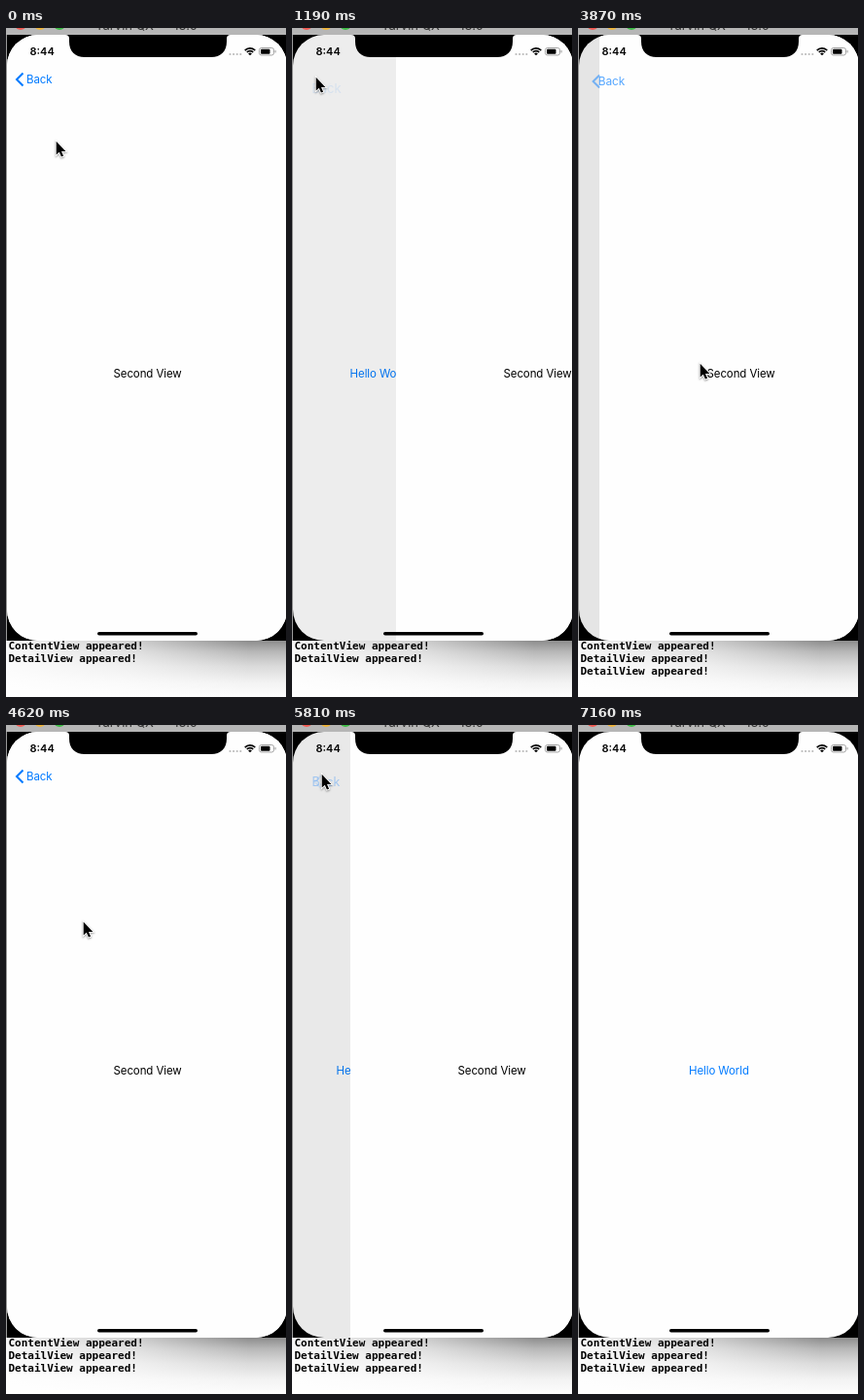
An HTML page with a canvas for the animation above (7760 ms loop, 288 px wide and 689 px high).

```html
<!DOCTYPE html>
<html lang="en">
<head>
<meta charset="utf-8">
<title>Navigation demo</title>
<style>
  html, body { margin: 0; width: 100%; height: 100%; overflow: hidden; background: #fff; }
  canvas { display: block; width: 288px; height: 689px; }
</style>
</head>
<body>
<canvas id="stage" width="288" height="689"></canvas>
<script>
const ctx = document.getElementById('stage').getContext('2d');
const W = 288, H = 689, LOOP = 7760, STEP = 149.1;
const BLUE = '#007aff';
const UI = 'Inter, Roboto, sans-serif';
const MONO = '"DejaVu Sans Mono", "Liberation Mono", monospace';

// Cursor keys: [step, x, y]
const PATH = [
  [1, 51, 116], [5, 24, 50], [15, 24, 50], [16, 60, 179], [21, 125, 345],
  [29, 125, 345], [36, 31, 54], [37, 30, 50], [40, 30, 50],
  [44, 129, 327], [47, 252, 658]
];

// Fraction of a critically damped slide begun at `start`
function slide(time, start) {
  const u = Math.max(0, time - start) * 0.018;
  const p = 1 - (1 + u) * Math.exp(-u);
  return p > 0.997 ? 1 : p;
}

function cursorAt(step) {
  if (step <= PATH[0][0]) return PATH[0].slice(1);
  for (let i = 1; i < PATH.length; i++) {
    const [s0, x0, y0] = PATH[i - 1], [s1, x1, y1] = PATH[i];
    if (step <= s1) {
      const u = (step - s0) / (s1 - s0), e = u * (2 - u);
      return [x0 + (x1 - x0) * e, y0 + (y1 - y0) * e];
    }
  }
  return null;
}

function rect(x, y, w, h, color) {
  ctx.fillStyle = color;
  ctx.fillRect(x, y, w, h);
}

function pill(x, y, w, h, r, color) {
  ctx.beginPath();
  ctx.roundRect(x, y, w, h, r);
  ctx.fillStyle = color;
  ctx.fill();
}

function disc(x, y, r, color) {
  ctx.beginPath();
  ctx.arc(x, y, r, 0, Math.PI * 2);
  ctx.fillStyle = color;
  ctx.fill();
}

function text(str, x, y, color, font, spacing = '0px') {
  ctx.font = font;
  ctx.letterSpacing = spacing;
  ctx.fillStyle = color;
  ctx.fillText(str, x, y);
}

function label(str, x, y, color) {
  text(str, x, y, color, '400 11.5px ' + UI, '-0.1px');
}

function fade(x0, y0, x1, y1, stops) {
  const g = ctx.createLinearGradient(x0, y0, x1, y1);
  stops.forEach(([at, color]) => g.addColorStop(at, color));
  return g;
}

function drawConsole(lines) {
  rect(0, 0, W, H, '#fff');
  rect(0, 631, W, 58, fade(0, 631, 0, 689, [
    [0, '#8c8c8c'], [0.2, '#b8b8b8'], [0.45, '#dadada'], [0.75, '#f3f3f3'], [1, '#fdfdfd']
  ]));
  rect(0, 631, W, 58, fade(0, 0, 250, 0, [
    [0, 'rgba(255,255,255,.9)'], [0.5, 'rgba(255,255,255,.6)'], [1, 'rgba(255,255,255,0)']
  ]));
  lines.forEach((s, i) => text(s, 2.5, 640 + i * 13, '#000', 'bold 11px ' + MONO));
}

function drawWindow() {
  rect(0, 0, W, 7, '#b6b6b6');
  ['#f25a52', '#f0b53a', '#3dbd45'].forEach((c, i) => disc(15 + i * 20, -4, 6, c));
  text('Tarvin QX — 13.0', 92, 2, '#333', '400 13px ' + UI);
  rect(0, 7, 1, 624, '#999');
  rect(1, 7, 287, 624, '#000');
}

function drawBack(q, pressed) {
  const strength = pressed ? 0.2 : 1;
  ctx.save();
  ctx.translate(0, 27 * q);
  ctx.globalAlpha = strength * (1 - q) ** 9;
  ctx.strokeStyle = BLUE;
  ctx.lineWidth = 2;
  ctx.beginPath();
  ctx.moveTo(17.5 + 60 * q, 46.5);
  ctx.lineTo(11 + 60 * q, 53);
  ctx.lineTo(17.5 + 60 * q, 59.5);
  ctx.stroke();
  ctx.globalAlpha = strength * (1 - q) ** 5;
  ctx.translate(21 - 2 * q, 57);
  ctx.scale(1 + 0.4 * q, 1 + 0.4 * q);
  label('Back', 0, 0, BLUE);
  ctx.restore();
}

// q: 0 shows the second view, 1 the first
function drawViews(q, pressedBack, pressedLink) {
  ctx.save();
  ctx.beginPath();
  ctx.roundRect(1, 7, 288, 624, 32);
  ctx.clip();
  rect(1, 7, 288, 624, '#fefefe');
  if (q > 0) {
    ctx.globalAlpha = pressedLink ? 0.25 : 1;
    label('Hello World', 114 - 86.4 * (1 - q), 360, BLUE);
    ctx.globalAlpha = 1;
    rect(1, 7, 288, 624, `rgba(0,0,0,${0.105 * (1 - q)})`);
  }
  if (q < 1) {
    const x = Math.round(288 * q);
    rect(x, 7, 290, 624, '#fefefe');
    label('Second View', 110.5 + x, 360, '#000');
    drawBack(q, pressedBack);
  }
  ctx.restore();
}

function drawStatus() {
  ctx.fillStyle = '#000';
  ctx.beginPath();
  ctx.moveTo(61, 7);
  ctx.quadraticCurveTo(65, 7, 65, 11);
  ctx.lineTo(65, 14);
  ctx.bezierCurveTo(65, 24, 71, 30, 81, 30);
  ctx.lineTo(211, 30);
  ctx.bezierCurveTo(221, 30, 227, 24, 227, 14);
  ctx.lineTo(227, 11);
  ctx.quadraticCurveTo(227, 7, 231, 7);
  ctx.fill();

  text('8:44', 24.5, 28, '#000', '600 11px ' + UI);
  for (let i = 0; i < 4; i++) disc(230.5 + i * 3.6, 27, 1.1, '#bbb');

  ctx.strokeStyle = '#000';
  ctx.lineWidth = 1.7;
  [7.2, 4.4].forEach(r => {
    ctx.beginPath();
    ctx.arc(251, 28, r, -Math.PI * 0.76, -Math.PI * 0.24);
    ctx.stroke();
  });
  ctx.beginPath();
  ctx.moveTo(251, 28.2);
  ctx.arc(251, 28.2, 2.6, -Math.PI * 0.76, -Math.PI * 0.24);
  ctx.fillStyle = '#000';
  ctx.fill();

  ctx.beginPath();
  ctx.roundRect(260.5, 20.5, 15, 7.5, 2.2);
  ctx.strokeStyle = '#999';
  ctx.lineWidth = 0.9;
  ctx.stroke();
  pill(262, 21.8, 9.5, 5, 1, '#000');
  pill(276.6, 23, 1, 2.6, 0.5, '#999');
  pill(94, 622, 103, 3.6, 1.8, '#000');
}

function drawCursor(x, y) {
  ctx.save();
  ctx.translate(x + 0.7, y + 0.8);
  ctx.beginPath();
  ctx.moveTo(0, 0);
  ctx.lineTo(0, 13.8);
  ctx.lineTo(3.1, 10.9);
  ctx.lineTo(5.2, 15.8);
  ctx.lineTo(7.4, 14.9);
  ctx.lineTo(5.3, 10.1);
  ctx.lineTo(9.7, 10.1);
  ctx.closePath();
  ctx.shadowColor = 'rgba(0,0,0,.4)';
  ctx.shadowBlur = 2;
  ctx.shadowOffsetY = 1;
  ctx.strokeStyle = '#fff';
  ctx.lineWidth = 1.8;
  ctx.stroke();
  ctx.shadowColor = 'transparent';
  ctx.fillStyle = '#000';
  ctx.fill();
  ctx.restore();
}

function render(t) {
  const step = Math.floor((t + 10) / STEP), time = step * STEP;
  const q = slide(time, 1121) - slide(time, 3642) + slide(time, 5768);
  const lines = ['ContentView appeared!', 'DetailView appeared!'];
  if (step >= 25) lines.push(lines[1]);

  drawConsole(lines);
  drawWindow();
  drawViews(q, step === 7 || step === 37 || step === 38, step === 24);
  drawStatus();
  const pos = cursorAt(step);
  if (pos) drawCursor(Math.round(pos[0]), Math.round(pos[1]));
}

const begin = performance.now();
function tick() {
  render((performance.now() - begin) % LOOP);
  requestAnimationFrame(tick);
}
tick();
</script>
</body>
</html>
```
